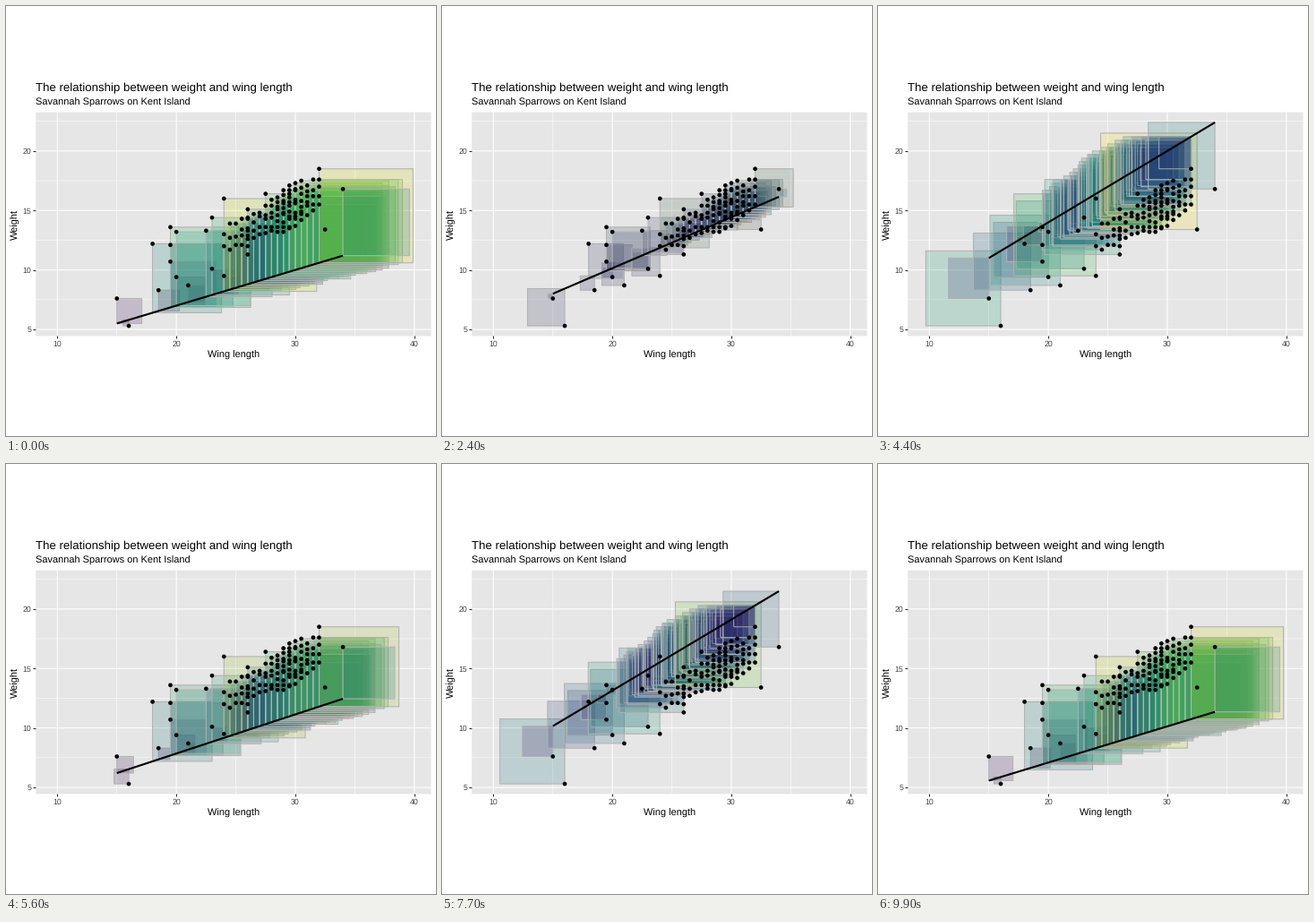
Write a matplotlib script that moves like this. It is 480 px wide and 480 px high and loops after 10 s.

```python
from itertools import product

import numpy as np
import matplotlib.pyplot as plt
from matplotlib.animation import FuncAnimation
from matplotlib.collections import PolyCollection

plt.rcParams.update({"font.family": "Liberation Sans", "text.hinting": "none",
                     "path.snap": False})
SIZE, DPI = 480, 72  # at 72 dpi one point is one pixel

# Outlying birds (wing, weight)
OUTLIERS = [(15, 7.6), (16, 5.3), (18, 12.2), (18.5, 8.3), (19.5, 13.6),
            (19.5, 12.1), (19.5, 10.7), (20, 13.2), (20, 9.4), (21, 8.7),
            (22.5, 13.3), (23, 14.4), (23, 10.1), (24, 16), (24, 13),
            (24, 12), (24, 9.5), (26, 11.3), (27.5, 16.4), (32, 18.5),
            (32.5, 13.4), (34, 16.8)]


def make_birds(rng):
    """Columns of birds every half unit, fullest near wings of 29.5 and 26."""
    birds = list(OUTLIERS)
    for wing in np.arange(24.5, 32.1, 0.5):
        peaks = 8 * np.exp(-((wing - 29.5) / 1.6) ** 2) + 5 * np.exp(-8 * (wing - 26) ** 2)
        count = round(3 + peaks)
        mid, spread = 15 + 0.5 * (wing - 29), 0.6 + 0.11 * count
        weights = np.linspace(mid - spread, mid + spread, count) + rng.normal(0, 0.12, count)
        birds += [(wing, g) for g in weights.round(1)]
    return np.array(sorted(birds, key=sum))


x, y = make_birds(np.random.default_rng(4)).T

# Intercept and slope of each line, ending with the best fit
LINES = np.array(list(product((1, 2, 1.2), (0.3, 0.6))) + [(1.366, 0.467)])
HOLD = 4
lengths = np.array([11] * 3 + [10] * 4)
starts = np.cumsum(lengths + HOLD) - lengths - 1

M_XYZ = np.array([[0.4124, 0.3576, 0.1805],
                  [0.2126, 0.7152, 0.0722],
                  [0.0193, 0.1192, 0.9505]])
WHITE = M_XYZ.sum(axis=1)
M_LAB = np.array([[0, 116, 0], [500, -500, 0], [0, 200, -200]])


def to_lab(rgb):
    lin = np.where(rgb > 0.04045, ((rgb + 0.055) / 1.055) ** 2.4, rgb / 12.92)
    v = lin @ M_XYZ.T / WHITE
    f = np.where(v > 0.008856, np.cbrt(v), 7.787 * v + 16 / 116)
    return f @ M_LAB.T - [16, 0, 0]


def to_rgb(lab):
    f = (lab + [16, 0, 0]) @ np.linalg.inv(M_LAB).T
    v = np.where(f > 0.2069, f ** 3, (f - 16 / 116) / 7.787)
    lin = np.clip((v * WHITE) @ np.linalg.inv(M_XYZ).T, 0, 1)
    return np.where(lin > 0.0031308, 1.055 * lin ** (1 / 2.4) - 0.055, 12.92 * lin)


squared = np.array([(y - a - b * x) ** 2 for a, b in LINES])
viridis = plt.get_cmap("viridis")
labs = to_lab(viridis(squared / squared.max())[..., :3] ** 1.22)

fig = plt.figure(figsize=(SIZE / DPI, SIZE / DPI), dpi=DPI, facecolor="white")
LEFT, RIGHT, TOP, BOTTOM = 33.3, 474.5, 118.6, 368.4
ax = fig.add_axes([LEFT / SIZE, 1 - BOTTOM / SIZE,
                   (RIGHT - LEFT) / SIZE, (BOTTOM - TOP) / SIZE])
ax.set(xlim=(8.19, 41.41), ylim=(4.445, 23.255), facecolor="#e6e6e6",
       xticks=range(10, 41, 10), yticks=range(5, 21, 5))
ax.set_xticks(range(15, 36, 10), minor=True)
ax.set_yticks(np.arange(7.5, 23, 5), minor=True)
ax.set_axisbelow(True)
ax.grid(which="major", color="white", lw=1.07)
ax.grid(which="minor", color="white", lw=0.53)
ax.tick_params(which="major", length=2.75, width=1.07, pad=2.2,
               color="#2b2b2b", labelcolor="#444444", labelsize=8.8)
ax.tick_params(which="minor", length=0)
for spine in ax.spines.values():
    spine.set_visible(False)


def label(px, py, text, size, **kw):
    fig.text(px / SIZE, 1 - py / SIZE, text, fontsize=size, color="black",
             va="baseline", **kw)


label(LEFT, 95, "The relationship between weight and wing length", 13.2)
label(LEFT, 111, "Savannah Sparrows on Kent Island", 11)
label(253.9, 393, "Wing length", 11, ha="center")
label(14, 243.5, "Weight", 11, ha="center", rotation=90, rotation_mode="anchor")

squares = PolyCollection([], edgecolors="#b2b2b2", linewidths=1.07, zorder=3)
ax.add_collection(squares, autolim=False)
# One size per dot keeps the dots off the pixel grid
ax.scatter(x, y, s=np.full(len(x), 4.7 ** 2), color="black", lw=0, zorder=4)
line, = ax.plot([], [], color="black", lw=2.13, solid_capstyle="butt", zorder=5)
ends = np.array([15, 34])


def progress(i):
    """Current line, next line and eased share of the way between them."""
    k = max(np.searchsorted(starts, i, side="right") - 1, 0)
    u = np.clip((i - starts[k]) / lengths[k], 0, 1)
    return k, (k + 1) % len(LINES), (1 - np.cos(np.pi * u)) / 2


def draw(i):
    k, n, t = progress(i)
    a, b = LINES[k] + t * (LINES[n] - LINES[k])
    fit = a + b * x
    far = x + y - fit
    corners = [(x, y), (far, y), (far, fit), (x, fit)]
    squares.set_verts(np.array(corners).transpose(2, 0, 1))
    rgb = to_rgb(labs[k] + t * (labs[n] - labs[k]))
    squares.set_facecolor(np.column_stack([rgb, np.full(len(x), 0.2)]))
    line.set_data(ends, a + b * ends)
    return squares, line


anim = FuncAnimation(fig, draw, frames=100, interval=100, repeat=True, repeat_delay=0)
plt.show()
```
